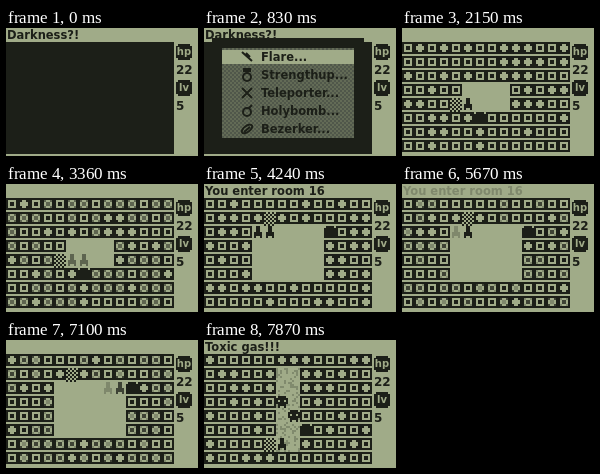
An HTML page with a canvas for the animation above (8 s loop, 192 by 128 pixels).

```html
<!DOCTYPE html>
<html lang="en">
<head>
<meta charset="utf-8">
<title>Dungeon</title>
<style>
html, body { margin: 0; width: 100%; height: 100%; overflow: hidden; background: #a0ab88; }
canvas { display: block; width: 192px; height: 128px; image-rendering: pixelated; }
</style>
</head>
<body>
<canvas id="stage" width="192" height="128"></canvas>
<script>
const LIGHT = '#a0ab88', DARK = '#1c1f18';
const LOOP = 8000, STEP = 110;
const screen = document.getElementById('stage').getContext('2d');
const buffer = document.createElement('canvas');
buffer.width = 192;
buffer.height = 128;
const g = buffer.getContext('2d');

// Rooms are [column, row, columns, rows] on a grid of 12 x 14 cells.
const cellar = { area: [5, 3, 4, 2], entry: [4, 4], exit: [6, 5] };
const hall = { area: [4, 2, 6, 4], entry: [5, 1], exit: [10, 2] };
const shaft = { area: [6, 1, 2, 6], entry: [5, 6], exit: [8, 5], gas: true };
const items = ['Flare', 'Strengthup', 'Teleporter', 'Holybomb', 'Bezerker'];

const events = [
  { at: -LOOP, draw: darkness },
  { at: 500, draw: () => menu(0) },
  { at: 1160, draw: () => menu(1), hard: true },
  { at: 1490, draw: () => menu(2), hard: true },
  { at: 1710, draw: () => dungeon(cellar, 11, [5, 4]) },
  { at: 3360, draw: () => dungeon(cellar, 12, [6, 4]) },
  { at: 3910, draw: () => dungeon(hall, 13, [5, 2], [[4, 2]], 'You enter room 16') },
  { at: 5560, draw: () => dungeon(hall, 14, [5, 2]) },
  { at: 6110, draw: () => dungeon(hall, 15, [6, 2]) },
  { at: 6440, draw: () => dungeon(hall, 16, [7, 2]) },
  { at: 6660, draw: () => dungeon(hall, 17, [8, 2]) },
  { at: 6990, draw: () => dungeon(hall, 18, [9, 2]) },
  { at: 7650, draw: () => dungeon(shaft, 19, [6, 6], [[6, 3], [7, 4]], 'Toxic gas!!!') }
];

function random(seed) {
  let s = seed * 7919 + 17;
  return () => (s = (s * 16807) % 2147483647) / 2147483647;
}

function box(x, y, w, h, color = DARK) {
  g.fillStyle = color;
  g.fillRect(x, y, w, h);
}

function write(text, x, y, { color = DARK, size = 11.5, align = 'left' } = {}) {
  g.font = `bold ${size}px "DejaVu Sans", sans-serif`;
  g.textAlign = align;
  g.fillStyle = color;
  g.fillText(text, x, y);
}

function badge(label, y) {
  box(172, y, 12, 16);
  box(170, y + 2, 16, 12);
  write(label, 178, y + 11, { color: LIGHT, size: 10, align: 'center' });
}

function base(title) {
  box(0, 0, 192, 128, LIGHT);
  write(title, 1, 11);
  badge('hp', 16);
  write('22', 170, 46, { size: 12 });
  badge('lv', 52);
  write('5', 170, 82, { size: 12 });
}

function darkness() {
  base('Darkness?!');
  box(0, 14, 168, 112);
}

function icon(kind, x, y) {
  g.save();
  g.translate(x, y);
  g.fillStyle = g.strokeStyle = DARK;
  g.lineWidth = 2;
  g.beginPath();
  if (kind === 0) {
    g.moveTo(-5, -5);
    g.lineTo(5, 4);
    g.moveTo(-1, -4);
    g.lineTo(3, 0);
  } else if (kind === 1) {
    g.rect(-3, -6, 6, 2);
    g.moveTo(4, 2);
    g.arc(0, 2, 4, 0, 7);
  } else if (kind === 2) {
    g.moveTo(-5, -5);
    g.lineTo(5, 5);
    g.moveTo(5, -5);
    g.lineTo(-5, 5);
  } else if (kind === 3) {
    g.arc(0, 1, 4, 0, 7);
    g.moveTo(2, -3);
    g.lineTo(5, -6);
  } else {
    g.ellipse(0, 0, 6, 3, -0.6, 0, 7);
    g.moveTo(-3, 3);
    g.lineTo(3, -2);
  }
  g.stroke();
  g.restore();
}

function menu(first) {
  darkness();
  box(8, 10, 152, 110);
  box(18, 20, 132, 90, '#636b56');
  for (let y = 20; y < 110; y += 2) {
    for (let x = 18 + y % 4; x < 150; x += 4) box(x, y, 2, 2, '#50574a');
  }
  box(18, 22, 132, 14, LIGHT);
  for (let row = 0; row < 5; row++) {
    const kind = (first + row) % items.length;
    const y = 20 + row * 18;
    icon(kind, 43, y + 9);
    write(items[kind] + '...', 57, y + 13);
  }
}

function wall(x, y, round) {
  box(x, y, 12, 12);
  if (round) {
    box(x + 4, y + 2, 4, 8, LIGHT);
    box(x + 2, y + 4, 8, 4, LIGHT);
  } else {
    box(x + 2, y + 2, 8, 8, LIGHT);
    box(x + 4, y + 4, 4, 4);
  }
}

function checker(x, y) {
  box(x, y, 12, 14, LIGHT);
  for (let i = 0; i < 42; i++) {
    const cx = i % 6, cy = Math.floor(i / 6);
    if ((cx + cy) % 2 === 0) box(x + cx * 2, y + cy * 2, 2, 2);
  }
}

function exit(x, y) {
  box(x, y, 12, 14, LIGHT);
  box(x + 2, y, 8, 2);
  box(x, y + 2, 12, 10);
}

function hero(x, y) {
  box(x + 4, y, 4, 4);
  box(x + 4, y + 4, 4, 4);
  box(x + 2, y + 6, 8, 4);
  box(x + 2, y + 10, 2, 2);
  box(x + 8, y + 10, 2, 2);
}

function monster(x, y) {
  box(x + 2, y, 8, 12);
  box(x, y + 2, 12, 6);
  box(x + 2, y + 4, 2, 2, LIGHT);
  box(x + 8, y + 4, 2, 2, LIGHT);
  box(x + 4, y + 10, 4, 2, LIGHT);
}

function place(shape, [column, row]) {
  shape(column * 12, 14 + row * 14);
}

function dungeon(room, seed, player, others = [], title = '') {
  base(title);
  const next = random(seed);
  for (let i = 0; i < 112; i++) wall((i % 14) * 12, 14 + Math.floor(i / 14) * 14, next() < 0.4);
  const [column, row, columns, rows] = room.area;
  const x = column * 12, y = 14 + row * 14;
  box(x, y, columns * 12, rows * 14, LIGHT);
  if (room.gas) {
    for (let i = 0; i < 150; i++) {
      box(x + Math.floor(next() * 12) * 2, y + Math.floor(next() * 42) * 2, 2, 2, '#808a6d');
    }
  }
  place(checker, room.entry);
  place(exit, room.exit);
  others.forEach(spot => place(room.gas ? monster : hero, spot));
  place(hero, player);
}

// Each new picture replaces the last with a slow, stepped afterglow.
function blend({ at, hard }, time) {
  const steps = Math.floor((time - at) / STEP) + 1;
  return hard || steps > 2 ? 1 : 1 - 0.5 ** steps;
}

function frame(now) {
  const time = now % LOOP;
  const shown = events.filter(event => event.at <= time);
  let start = shown.length - 1;
  while (start > 0 && blend(shown[start], time) < 1) start--;
  for (const event of shown.slice(start)) {
    event.draw();
    screen.globalAlpha = blend(event, time);
    screen.drawImage(buffer, 0, 0);
  }
  requestAnimationFrame(frame);
}
requestAnimationFrame(frame);
</script>
</body>
</html>
```
